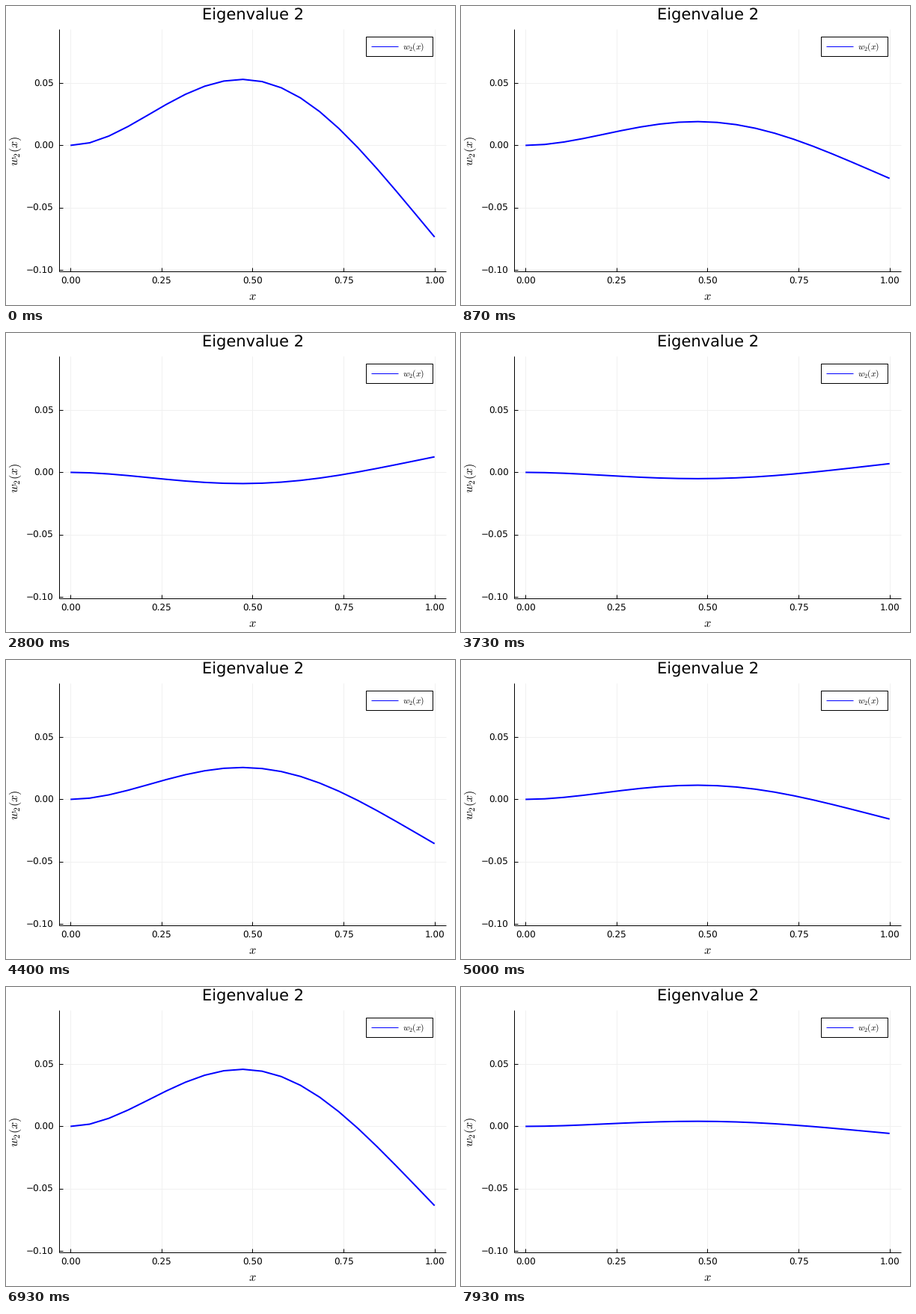
A matplotlib script that plays this animation: 600x400 px, repeating every 8 s.

```python
import numpy as np
import matplotlib.pyplot as plt
from matplotlib.animation import FuncAnimation
from matplotlib.patches import Rectangle

LOOP_MS, FRAMES = 8000, 240  # two frames per pose
PT = 0.72  # points per pixel at 100 dpi
BLUE, GRID = "#0000ff", "#f0f0f0"
LEFT, RIGHT, TOP, BOTTOM = 71, 588, 31, 355

plt.rcParams.update({
    "font.family": "DejaVu Sans",
    "mathtext.fontset": "cm",
    "text.hinting": "none",
})


def px(x):
    return 86.2 + 486.5 * x


def py(y):
    return 186.45 - 1668 * y


def bending_mode(x, b=4.694091):
    """Second mode of a clamped-free beam, with a tip value of 1."""
    sigma = (np.cosh(b) + np.cos(b)) / (np.sinh(b) + np.sin(b))
    bx = b * x
    w = np.cosh(bx) - np.cos(bx) - sigma * (np.sinh(bx) - np.sin(bx))
    return w / w[-1]


# Turning points of the tip: pose number and deflection
TURN_AT = [0, 24, 33, 45, 56, 71, 78, 103, 114, 120]
TURN_W = [-0.0735, 0.0097, -0.0443, 0.0222, 0.007,
          -0.0497, 0.0058, -0.065, 0.006, -0.0065]


def tip(pose):
    """Swing from one turning point to the next with cosine easing."""
    turn = np.interp(pose, TURN_AT, range(len(TURN_AT)))
    i = min(int(turn), len(TURN_W) - 2)
    ease = (1 - np.cos(np.pi * (turn - i))) / 2
    return TURN_W[i] + (TURN_W[i + 1] - TURN_W[i]) * ease


fig = plt.figure(figsize=(6, 4), dpi=100, facecolor="white")
ax = fig.add_axes([0, 0, 1, 1])
ax.set(xlim=(0, 600), ylim=(400, 0))
ax.axis("off")


def line(xs, ys, color="black", width=1.0, z=2):
    return ax.plot(xs, ys, color=color, lw=width * PT, zorder=z,
                   solid_capstyle="butt", solid_joinstyle="round")[0]


def label(tx, ty, s, size, ha="center", **kw):
    ax.text(tx, ty, s, fontsize=size * PT, ha=ha, va="baseline",
            color="black", **kw)


for v in np.linspace(0, 1, 5):
    line([px(v)] * 2, [TOP, BOTTOM], GRID, z=1)
    line([px(v)] * 2, [BOTTOM - 5, BOTTOM])
    label(px(v), 371.6, f"{v:.2f}", 12)

for v in (-0.1, -0.05, 0, 0.05):
    line([LEFT, RIGHT], [py(v)] * 2, GRID, z=1)
    line([LEFT, LEFT + 5], [py(v)] * 2)
    label(63.5, py(v) + 4.3, f"{v:.2f}".replace("-", "\u2212"), 12, "right")

line([LEFT, LEFT], [TOP, BOTTOM])
line([LEFT, RIGHT], [BOTTOM, BOTTOM])

label(330, 18.2, "Eigenvalue 2", 21)
label(329, 392.4, "$x$", 16.5)
label(17, 193.7, "$w_2(x)$", 16.2, rotation=90, rotation_mode="anchor")

x = np.linspace(0, 1, 20)
mode = bending_mode(x)
curve = line(px(x), py(0 * x), BLUE, 2, z=3)

ax.add_patch(Rectangle((481, 41), 89, 26, fc="white", ec="black",
                       lw=PT, zorder=4))
line([487.5, 523.5], [54, 54], BLUE, z=5)
label(529.5, 58.6, "$w_2(x)$", 11.5, "left", zorder=5)


def draw(frame):
    pose = (frame + 1) // 2
    curve.set_ydata(py(tip(pose) * mode))
    return [curve]


anim = FuncAnimation(fig, draw, frames=FRAMES, interval=LOOP_MS / FRAMES,
                     repeat=True, repeat_delay=0)
plt.show()
```
